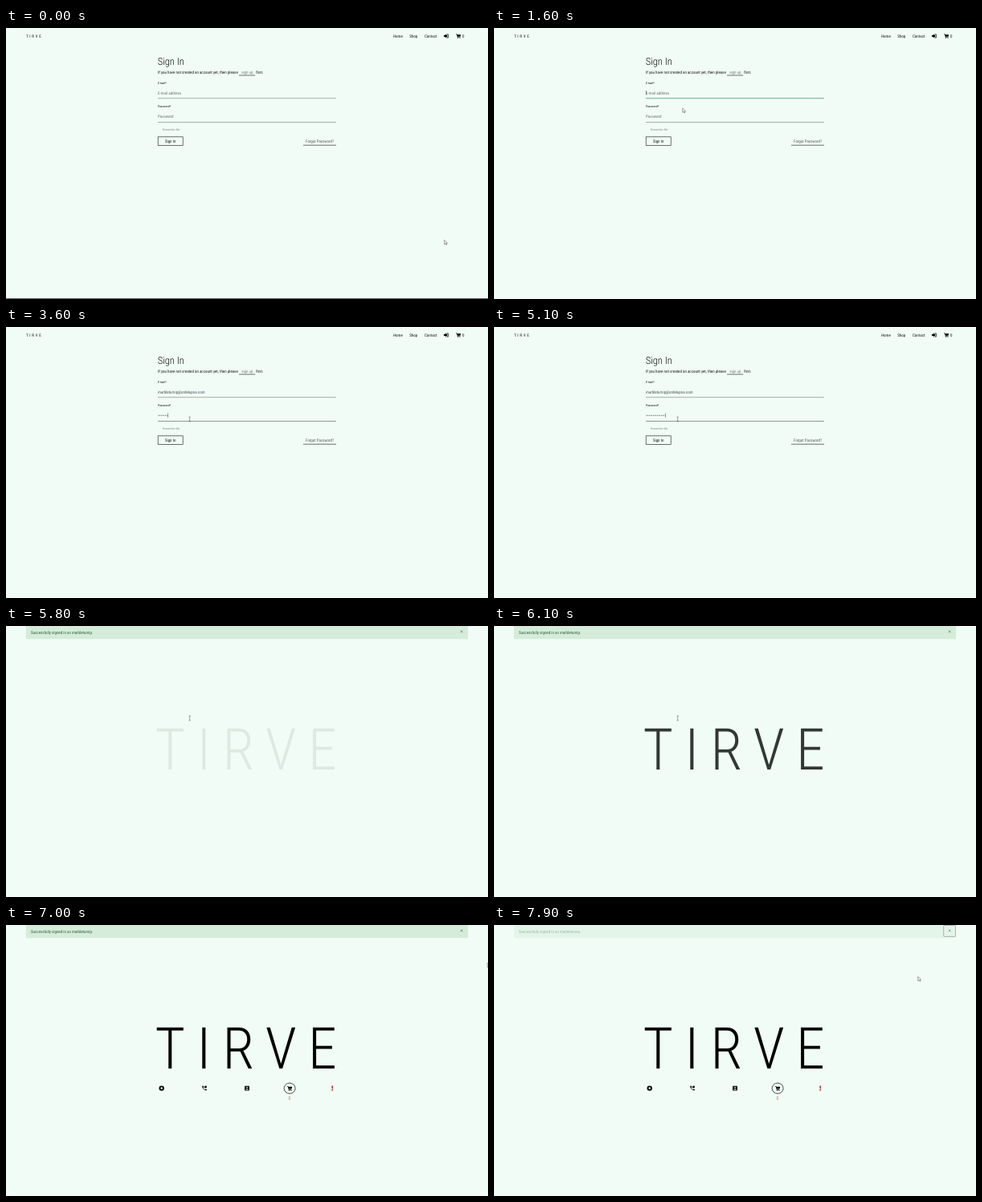
Write an HTML page that moves like this. It is 600 by 338 pixels and loops after 8000 ms.

```html
<!DOCTYPE html>
<html lang="en">
<head>
<meta charset="utf-8">
<title>Sign in</title>
<style>
  html, body { margin: 0; width: 100%; height: 100%; overflow: hidden; background: #f0fcf5; }
  svg { display: block; width: 100vw; height: 100vh; }
  text {
    font: 400 5px "Roboto Condensed", Roboto, sans-serif;
    font-stretch: 75%;
    letter-spacing: var(--squeeze, 0em);
    text-rendering: geometricPrecision;
    fill: #111;
    white-space: pre;
  }
  .light { font-weight: 300; }
  .small { font-size: 3.75px; }
  .muted { fill: #68716c; }
  .brand { letter-spacing: calc(.35em + var(--squeeze, 0em)); }
  .hero { font-size: 72px; font-weight: 300; fill: #000; letter-spacing: calc(.2em + var(--squeeze, 0em)); }
  .thin { fill: none; stroke: #333; stroke-width: .7; }
</style>
</head>
<body>
<svg viewBox="0 0 600 338" preserveAspectRatio="none">
  <defs>
    <g id="cart">
      <path d="M1 2h5l.7 3H23l-2.6 10H9l.5 2H20v2H7.6L4.6 4.500H1z"/>
      <circle cx="9.500" cy="21" r="2"/><circle cx="18.500" cy="21" r="2"/>
    </g>
  </defs>
  <rect width="600" height="338" fill="#f0fcf5"/>

  <g id="login">
    <text class="brand" x="25" y="11.8">TIRVE</text>
    <text x="482" y="11.8">Home</text>
    <text x="502.2" y="11.8">Shop</text>
    <text x="521" y="11.8">Contact</text>
    <g transform="translate(545 7.3)">
      <path d="M0 1.8H2V.3L4.700 2.700L2 5.200V3.700H0z"/>
      <path d="M3.700.6H5.300V4.900H3.700" fill="none" stroke="#000" stroke-width=".8" stroke-linejoin="round"/>
    </g>
    <use href="#cart" transform="translate(559.8 7) scale(.28 .25)"/>
    <text x="567.9" y="11.8">0</text>

    <text class="light" x="188.7" y="45.8" style="font-size:12.5px">Sign In</text>
    <text x="189" y="56.7">If you have not created an account yet, then please</text>
    <text class="light" x="293.3" y="56.7" fill-opacity=".8">sign up</text>
    <path class="thin" d="M290 59H310.200"/>
    <text x="311.2" y="56.7">first.</text>

    <text class="small" x="189" y="69.8">E-mail*</text>
    <text id="email" x="189" y="82.7"></text>
    <path id="emailLine" d="M189 87.700H411" stroke-width=".9"/>
    <text class="small" x="189" y="98.9">Password*</text>
    <text id="hint" class="muted" x="189" y="112">Password</text>
    <path id="dots" fill="none" stroke="#444" stroke-width="1" stroke-linecap="round" stroke-dasharray="0 1.7"/>
    <path id="passLine" d="M189 117.500H411" stroke-width=".9"/>
    <rect id="caret" width=".5" height="5.4" fill="#333"/>

    <text class="small" x="195" y="128.4" style="fill:#8b938f">Remember Me</text>
    <rect class="thin" x="189.2" y="135.8" width="31" height="10.6"/>
    <text x="197.9" y="142.8">Sign In</text>
    <text class="light" x="373" y="142.6">Forgot Password?</text>
    <path class="thin" d="M370 146.200H411"/>
  </g>

  <g id="home">
    <g id="alert">
      <path d="M25.200 0H574.800V15q0 1-1 1H26.200q-1 0-1-1z" fill="#d4ecd9" stroke="#c9e7d0" stroke-width=".4"/>
      <text x="31" y="9.6" style="fill:#2a5a38">Successfully signed in as marbleturnip.</text>
    </g>
    <path d="M566 5.700l2.300 2.600m0-2.600l-2.300 2.600" stroke="#555f59" stroke-width=".6"/>
    <rect id="ring" x="559.7" y=".5" width="14.8" height="13.9" rx=".8" fill="none" stroke="#8f9b94" stroke-width=".7"/>
    <text id="hero" class="hero" x="185.500" y="179">TIRVE</text>
    <g id="menu">
      <circle cx="193.700" cy="203.600" r="2.250" fill="none" stroke="#000" stroke-width="1.9"/>
      <g transform="translate(243.3 199.900) scale(.31)">
        <path d="M3 3H8.500L9.500 8L6.600 10.800Q9 15.500 13.200 17.400L16 14.600L21 15.500V21Q3 20 3 3z"/>
        <path d="M12 3h9v7h-6l-3 3z"/>
      </g>
      <rect x="297.1" y="200.700" width="5.800" height="5.800" rx=".6"/>
      <g fill="#f0fcf5">
        <circle cx="300" cy="202.600" r=".95"/>
        <path d="M298.100 205.600V205q1.900-1.500 3.800 0v.6z"/>
      </g>
      <ellipse cx="353.100" cy="203.700" rx="7" ry="6.600" fill="none" stroke="#222" stroke-width=".8"/>
      <use href="#cart" transform="translate(349.6 200.500) scale(.29 .27)"/>
      <text class="light" x="353" y="217.500" text-anchor="middle" style="font-size:6px;fill:#d0222e">0</text>
      <path d="M405.400 200.500h1.600l-.3 4h-1z" fill="#a3150f"/>
      <circle cx="406.200" cy="205.800" r=".85" fill="#a3150f"/>
    </g>
  </g>

  <rect id="edge" y="337" width="600" height="1" fill="#59605c"/>
  <g id="pointer">
    <path id="arrow" d="M0 0V5.300L1.300 4.200L2.200 6L3 5.700L2.200 3.900H3.700z" fill="#fff" stroke="#444" stroke-width=".5"/>
    <path id="beam" d="M-1.100-2.800h2.200M0-2.800V2.800M-1.100 2.800h2.200" fill="none" stroke="#444" stroke-width=".5"/>
  </g>
</svg>
<script>
  const LOOP = 8000, STEP = 100, DOT = 1.7, LEFT = 189;
  const el = Object.fromEntries([...document.querySelectorAll('[id]')].map(n => [n.id, n]));
  const show = (node, on) => node.setAttribute('visibility', on ? 'inherit' : 'hidden');
  const within = (t, from, to) => t >= from && t < to;

  // Tracks hold [time, value, ...] rows with linear motion between them.
  const tracks = {
    pointer: [
      [300, 545.7, 264.5], [500, 450, 196], [700, 320, 110], [900, 266.5, 81],
      [1500, 266.5, 81], [1600, 234.8, 100], [1700, 231.5, 108], [1900, 228.7, 115],
      [6400, 228.7, 115], [6700, 390, 103], [7000, 599.2, 47.5], [7300, 576, 18],
      [7400, 573, 16], [7600, 567.3, 6.5], [7700, 567.3, 6.5], [7800, 555, 25], [7900, 527.8, 64.3]
    ],
    hero: [[5600, 0], [5700, .02], [5800, .07], [5900, .28], [6100, .78], [6200, .9], [6400, 1]],
    menu: [[6200, 0, 20], [6500, .5, 8], [6900, 1, 0]],
    alert: [[7700, 1], [7800, .75], [7900, .43]],
    emailFocus: [[800, 0], [1100, 1], [2000, 1], [2300, 0]],
    passFocus: [[2000, 0], [2300, 1]]
  };
  const keyTimes = [2800, 2900, 3000, 3100, 3400, 3500, 3600, 3700, 3900, 4100, 4200, 4700, 5000, 5100];

  function sample(track, t) {
    const i = track.findIndex(row => row[0] > t);
    if (i < 0) return track.at(-1).slice(1);
    if (i === 0) return track[0].slice(1);
    const [a, b] = [track[i - 1], track[i]];
    const k = (t - a[0]) / (b[0] - a[0]);
    return a.slice(1).map((v, j) => v + (b[j + 1] - v) * k);
  }

  function mix(a, b, k) {
    return `rgb(${a.map((v, i) => Math.round(v + (b[i] - v) * k))})`;
  }

  function drawForm(t) {
    const filled = t >= 1700;
    el.email.textContent = filled ? 'marbleturnip@ordelupna.com' : 'E-mail address';
    el.email.style.fill = filled ? '#495057' : '#68716c';

    const typed = keyTimes.filter(k => k <= t).length;
    show(el.hint, !typed);
    show(el.dots, typed);
    el.dots.setAttribute('d', `M${LEFT + DOT / 2} 110.300h${Math.max(0, typed - 1) * DOT + .01}`);

    const idle = [158, 168, 163];
    el.emailLine.setAttribute('stroke', mix(idle, [92, 168, 145], sample(tracks.emailFocus, t)[0]));
    el.passLine.setAttribute('stroke', mix(idle, [132, 142, 137], sample(tracks.passFocus, t)[0]));

    const inPassword = t >= 2100;
    show(el.caret, within(t, 900, 1100) || within(t, 1600, 2600) || t >= 2800);
    el.caret.setAttribute('x', inPassword ? LEFT + typed * DOT + .2 : filled ? 248 : LEFT);
    el.caret.setAttribute('y', inPassword ? 107.5 : 78.2);
  }

  function drawHome(t) {
    const [alpha, drop] = sample(tracks.menu, t);
    el.hero.setAttribute('opacity', sample(tracks.hero, t)[0]);
    el.menu.setAttribute('opacity', alpha);
    el.menu.setAttribute('transform', `translate(0 ${drop})`);
    el.alert.setAttribute('opacity', sample(tracks.alert, t)[0]);
    show(el.ring, t >= 7800);
  }

  function draw(now) {
    const t = Math.floor((now % LOOP) / STEP) * STEP;
    const signedIn = t >= 5600;
    show(el.login, !signedIn);
    show(el.home, signedIn);
    show(el.edge, t < 400);
    signedIn ? drawHome(t) : drawForm(t);

    const [x, y] = sample(tracks.pointer, t);
    const beam = within(t, 900, 1600) || within(t, 1800, 5300) || within(t, 5600, 6500);
    el.pointer.setAttribute('transform', `translate(${x} ${y})`);
    show(el.beam, beam);
    show(el.arrow, !beam);
  }

  // Tighten the tracking where no condensed face is available.
  function checkFace() {
    const probe = document.createElement('span');
    probe.textContent = 'condensed sample';
    probe.style.cssText = 'position:absolute;visibility:hidden;white-space:pre';
    document.body.append(probe);
    const width = (family, stretch) => {
      probe.style.font = `40px ${family}`;
      probe.style.fontStretch = stretch;
      return probe.getBoundingClientRect().width;
    };
    const narrow = width('"Roboto Condensed", Roboto, sans-serif', '75%');
    if (narrow > width('Roboto, sans-serif', '100%') * .96) {
      document.documentElement.style.setProperty('--squeeze', '-.058em');
    }
    probe.remove();
  }

  checkFace();
  const start = performance.now();
  function tick() {
    draw(performance.now() - start);
    requestAnimationFrame(tick);
  }
  tick();
</script>
</body>
</html>
```
